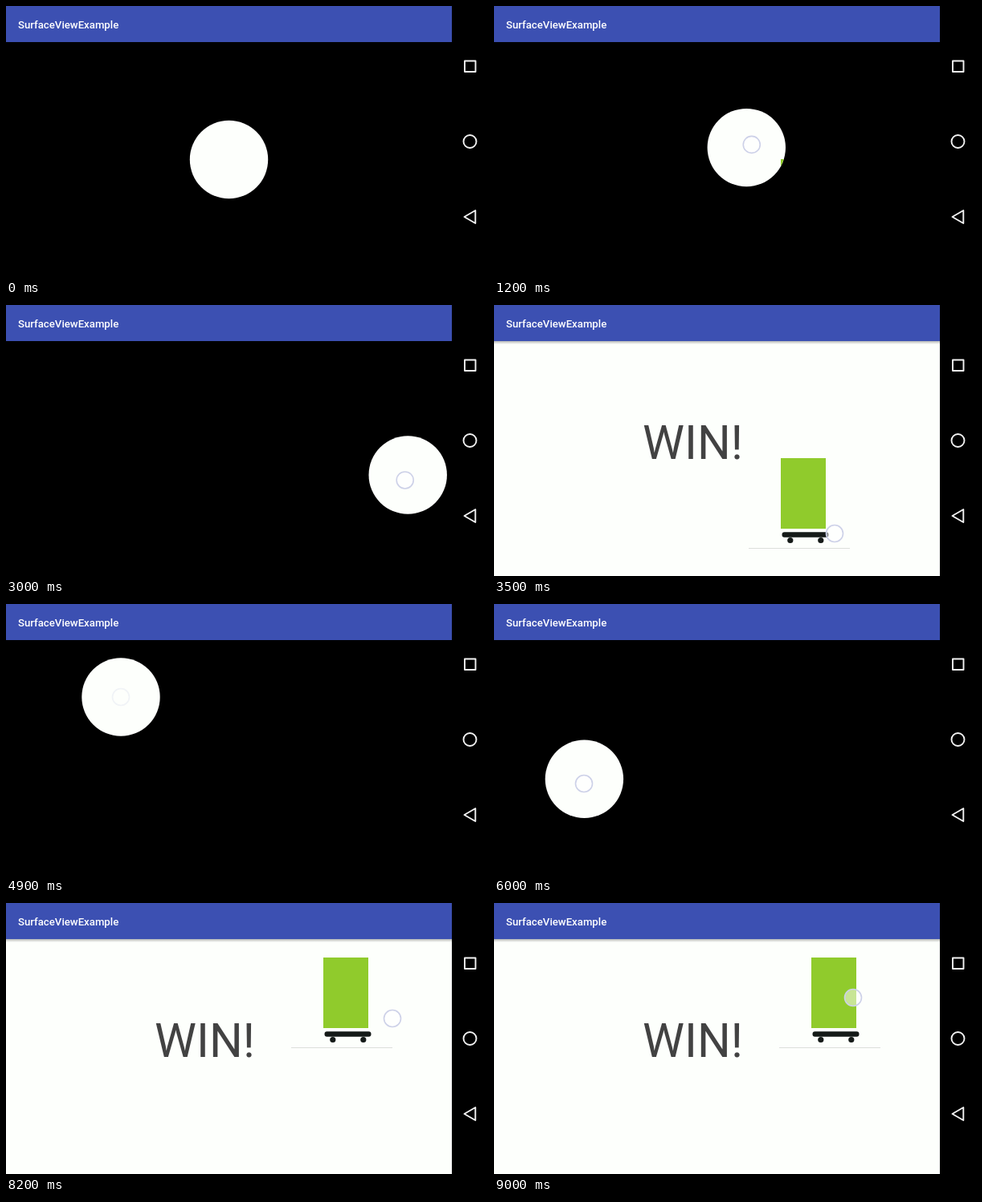
Write an HTML page with a canvas that moves like this. It is 600 px wide and 338 px high and loops after 9.1 s.

```html
<!DOCTYPE html>
<html lang="en">
<head>
<meta charset="utf-8">
<title>SurfaceViewExample</title>
<style>
  html, body { margin: 0; width: 100%; height: 100%; overflow: hidden; background: #000; }
  canvas { display: block; width: 600px; height: 338px; }
</style>
</head>
<body>
<canvas id="stage" width="600" height="338"></canvas>
<script>
const ctx = document.getElementById('stage').getContext('2d');
const LOOP = 9100, STEP = 100, LAG = 40;
const VIEW = { x: 0, y: 45, w: 555, h: 293 };
const PICTURE = { w: 126, h: 120 };

const key = (t, x, y) => ({ t, x, y });

// Each touch hides the picture in a new place, then the finger follows a smooth path.
const touches = [
  { start: 0, hidden: true, picture: [317, 184], path: [key(0, 277.5, 191.5)] },
  { start: 100, release: 3800, picture: [317, 184], path: [
    key(800, 283, 195), key(2100, 476, 97), key(2800, 507, 188),
    key(3500, 424, 285), key(3800, 362, 296.5)] },
  { start: 4900, release: LOOP, picture: [355, 61], path: [
    key(5400, 143, 116), key(6000, 112, 224), key(6400, 143, 262),
    key(7400, 355.5, 260), key(8200, 481, 144), key(8500, 505, 126), key(9000, 447, 118)] },
];

const clamp01 = v => Math.min(1, Math.max(0, v));

// Monotone cubic interpolation: smooth, without overshoot at turning points.
function smoothAt(path, axis, t) {
  const last = path.length - 1;
  if (t <= path[0].t) return path[0][axis];
  if (t >= path[last].t) return path[last][axis];
  const slope = i => (path[i + 1][axis] - path[i][axis]) / (path[i + 1].t - path[i].t);
  const tangent = i => {
    if (i === 0 || i === last) return 0;
    const a = slope(i - 1), b = slope(i);
    return a * b > 0 ? 2 * a * b / (a + b) : 0;
  };
  const i = path.findIndex(k => k.t > t) - 1;
  const span = path[i + 1].t - path[i].t;
  const p = (t - path[i].t) / span, q = 1 - p;
  return path[i][axis] * q * q * (1 + 2 * p) + path[i + 1][axis] * p * p * (1 + 2 * q)
    + span * p * q * (tangent(i) * q - tangent(i + 1) * p);
}

const pointAt = (path, t) => [smoothAt(path, 'x', t), smoothAt(path, 'y', t)];

function rect(x, y, w, h, color) {
  ctx.fillStyle = color;
  ctx.fillRect(x, y, w, h);
}

function disc(x, y, r, color) {
  ctx.beginPath();
  ctx.arc(x, y, r, 0, Math.PI * 2);
  ctx.fillStyle = color;
  ctx.fill();
}

function text(string, x, y, font, color) {
  ctx.font = font + ' Roboto, sans-serif';
  ctx.fillStyle = color;
  ctx.fillText(string, x, y);
}

function drawPicture([x, y]) {
  const dark = '#151a18';
  ctx.save();
  ctx.translate(x, y);
  rect(40, 7, 56, 88, '#90cb2c');
  ctx.beginPath();
  ctx.roundRect(41.5, 99.3, 58, 6.4, 3);
  ctx.fillStyle = dark;
  ctx.fill();
  for (const wheelX of [51.8, 89.8]) disc(wheelX, 109.5, 3.6, dark);
  rect(0, 119, PICTURE.w, 1, '#dcdedb');
  ctx.restore();
}

function drawView({ picture, path }, t) {
  const [x, y] = pointAt(path, t - LAG);
  const dx = x - picture[0], dy = y - picture[1];
  const won = dx > 0 && dx < PICTURE.w && dy > 0 && dy < PICTURE.h;
  ctx.save();
  ctx.beginPath();
  if (won) ctx.rect(VIEW.x, VIEW.y, VIEW.w, VIEW.h);
  else ctx.arc(x, y, 48.7, 0, Math.PI * 2);
  ctx.clip();
  rect(VIEW.x, VIEW.y, VIEW.w, VIEW.h, '#fdfffc');
  drawPicture(picture);
  if (won) text('WIN!', 185, 192, '58.6px', '#424242');
  ctx.restore();
}

function drawFinger({ start, release, hidden, path }, t) {
  if (hidden) return;
  const fadeIn = clamp01((t - start + STEP) / 400);
  const fadeOut = clamp01(1 - (t - release) / 700);
  ctx.globalAlpha = fadeIn * fadeOut;
  disc(...pointAt(path, t), 10.5, 'rgba(255,255,255,.5)');
  ctx.strokeStyle = '#cdd1e8';
  ctx.lineWidth = 1.6;
  ctx.stroke();
  ctx.globalAlpha = 1;
}

function drawHeader() {
  const shadow = ctx.createLinearGradient(0, 45, 0, 49);
  shadow.addColorStop(0, 'rgba(0,0,0,.28)');
  shadow.addColorStop(1, 'rgba(0,0,0,0)');
  rect(0, 45, 555, 4, shadow);
  rect(0, 0, 555, 45, '#3c50b2');
  text('SurfaceViewExample', 15, 27.5, '500 13.2px', '#fff');
}

function drawNavigation() {
  rect(555, 0, 45, 338, '#000');
  ctx.strokeStyle = '#f2f2f2';
  ctx.lineWidth = 1.9;
  ctx.lineJoin = 'round';
  ctx.beginPath();
  ctx.rect(571, 68.5, 13.5, 13.5);
  ctx.moveTo(585.5, 169);
  ctx.arc(577.5, 169, 8, 0, Math.PI * 2);
  ctx.moveTo(570.5, 263);
  ctx.lineTo(584.3, 255);
  ctx.lineTo(584.3, 271);
  ctx.closePath();
  ctx.stroke();
}

function draw(t) {
  const touch = touches.findLast(item => item.start <= t);
  rect(0, 0, 600, 338, '#000');
  drawView(touch, t);
  drawFinger(touch, t);
  drawHeader();
  drawNavigation();
}

const begin = performance.now();
function frame() {
  const elapsed = (performance.now() - begin) % LOOP;
  draw(Math.floor(elapsed / STEP) * STEP);
  requestAnimationFrame(frame);
}
frame();
</script>
</body>
</html>
```
